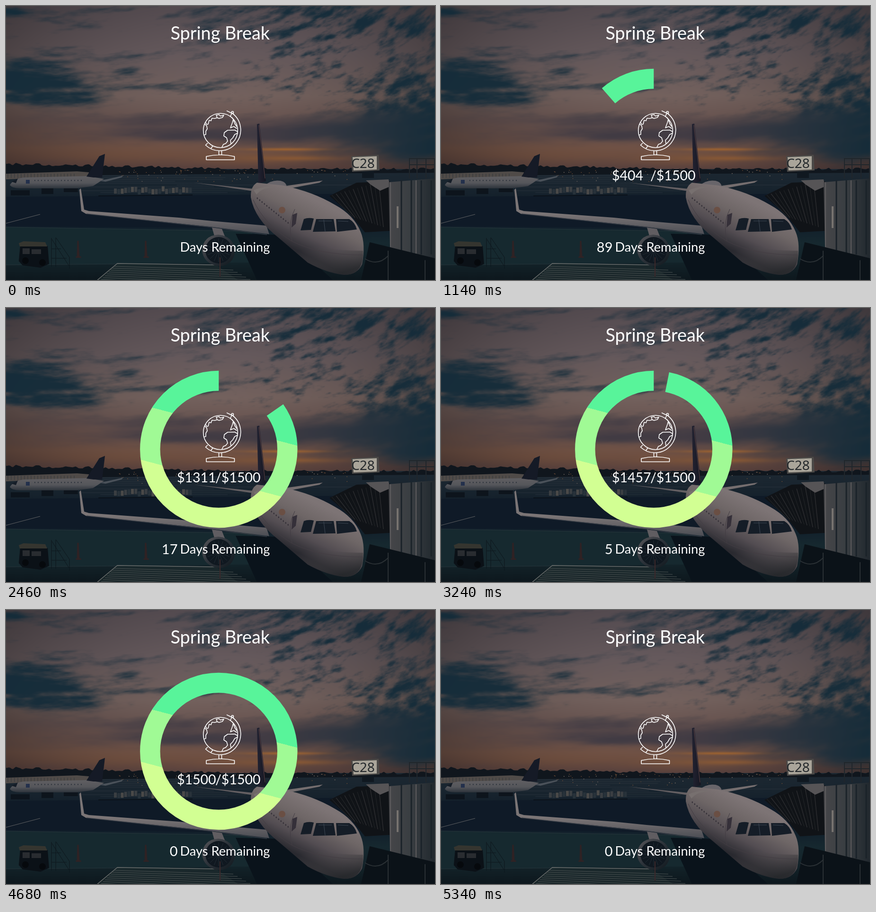
Recreate the animation shown at these times as an HTML page with a canvas. Size 906 by 580 pixels, loop 5460 ms.

```html
<!DOCTYPE html>
<html lang="en">
<head>
<meta charset="utf-8">
<title>Spring Break</title>
<style>
html, body { margin: 0; width: 100%; height: 100%; overflow: hidden; background: #101c26; }
canvas, svg { position: absolute; left: 0; top: 0; width: 906px; height: 580px; }
text { font-family: Lato, "Open Sans", sans-serif; fill: #fff; }
.icon { fill: none; stroke: #fff; stroke-width: 1.6; stroke-linejoin: round; stroke-linecap: round; }
</style>
</head>
<body>
<canvas id="photo" width="906" height="580"></canvas>
<svg viewBox="0 0 906 580">
  <defs>
    <linearGradient id="bands" gradientUnits="userSpaceOnUse" x1="0" y1="129.6" x2="-28.7" y2="238.7">
      <stop offset="0" stop-color="#58f49a"/><stop offset="0" stop-color="#a0fa95"/>
      <stop offset="1" stop-color="#a0fa95"/><stop offset="1" stop-color="#d2ff93"/>
    </linearGradient>
  </defs>
  <path id="ring" pathLength="360" fill="none" stroke="url(#bands)" stroke-width="42.5"
    d="M449.3 154A145 145 0 0 0 449.3 444A145 145 0 0 0 449.3 154"/>
  <g class="icon">
    <circle cx="453" cy="263.5" r="36.3"/>
    <path d="M477 226.500A44 44 0 1 1 421.500 294.500M421.500 294.500L425.500 290.500M432.500 302L436.500 296.500M466.500 222L481 229M473.500 234L477 227"/>
    <circle cx="478.300" cy="225.300" r="2.200"/>
    <path d="M449.500 307.500V315M455.500 307.500V315M423 325.500V318.500Q453 311.500 482.500 318.500V325.500Z"/>
    <path d="M427 250L429 242L433 243L435 237.500L441 238L446 236.500L444 231L450 230L453 233L460 231L457 236L450 238L446 236.500M427 250L424 251L422 247"/>
    <path d="M418 273L422 272L422 265L425 260L424 254L420 250"/>
    <path d="M480 240L478 247L474 258L481 255L487 259M477 236L480 240L483 249L487 255"/>
    <path d="M489 266L483 262.500L468 263L461 268L460 275L466 279L468 286L464 291L459 293L456 299M475 291L474 284L479 279L483 272L489 269"/>
  </g>
  <text x="347.500" y="71" font-size="37.800">Spring Break</text>
  <g id="money">
    <text id="saved" x="361" y="369" font-size="28.500"></text>
    <text x="537.500" y="369" font-size="28.500" text-anchor="end">/$1500</text>
  </g>
  <text id="days" x="362.500" y="520.500" font-size="29" text-anchor="end"></text>
  <text x="367.500" y="520" font-size="27.200">Days Remaining</text>
</svg>
<script>
const $ = id => document.getElementById(id);
const clamp = v => Math.max(0, Math.min(1, v));
const mix = (a, b, k) => a + (b - a) * k;
const mixRgb = (a, b, k) => a.map((v, i) => mix(v, b[i], k));
const smooth = (a, b, v) => { const k = clamp((v - a) / (b - a)); return k * k * (3 - 2 * k); };
const ctx = $('photo').getContext('2d');

// ---- Backdrop: cloudy dusk sky ----
function hash(x, y) {
  let h = Math.imul(x, 374761393) + Math.imul(y, 668265263);
  h = Math.imul(h ^ h >>> 13, 1274126177);
  return ((h ^ h >>> 16) >>> 0) / 2 ** 32;
}
function noise(x, y) {
  const i = Math.floor(x), j = Math.floor(y), u = smooth(0, 1, x - i), v = smooth(0, 1, y - j);
  return mix(mix(hash(i, j), hash(i + 1, j), u), mix(hash(i, j + 1), hash(i + 1, j + 1), u), v);
}
function fbm(x, y) {
  let sum = 0;
  for (let o = 0, amp = .5; o < 4; o++, amp /= 2) sum += amp * noise(x * 2 ** o + o * 17, y * 2 ** o);
  return sum;
}
const blob = (x, y, [cx, cy, rx, ry, amp]) => amp * Math.exp(-(((x - cx) / rx) ** 2) - ((y - cy) / ry) ** 2);
const clouds = [
  [5, 8, 45, 14, .5], [30, 160, 150, 36, .6], [110, 195, 110, 17, .4], [265, 102, 70, 9, .3],
  [410, 18, 80, 13, .3], [180, 50, 130, 14, .12], [310, 172, 110, 9, .2], [800, 40, 230, 60, .22],
  [620, 12, 110, 20, .2], [720, 135, 200, 45, .17], [900, 230, 170, 55, .5],
  [330, 242, 150, 15, .35], [400, 272, 210, 17, .45], [680, 262, 190, 26, .42], [880, 305, 180, 28, .4]
];
const glows = [[590, 303, 75, 3, .7], [615, 322, 80, 5, .4], [520, 322, 120, 14, .22], [240, 316, 180, 18, .12]];
const skyStops = [[0, [84, 75, 80]], [100, [101, 89, 92]], [190, [115, 97, 93]],
  [245, [104, 83, 79]], [300, [110, 81, 70]], [350, [84, 62, 60]]];
function skyLight(y) {
  const i = Math.max(1, skyStops.findIndex(s => s[0] > y));
  const [a, ca] = skyStops[i - 1], [b, cb] = skyStops[i];
  return mixRgb(ca, cb, (y - a) / (b - a));
}
function drawSky() {
  const img = ctx.createImageData(906, 348);
  for (let y = 0, p = 0; y < 348; y++) {
    const row = skyLight(y), low = smooth(195, 245, y);
    for (let x = 0; x < 906; x++, p += 4) {
      const tilt = y + x * x * .00022 * (1 - y / 400);
      let d = (fbm(x / 85, tilt / 15) - .47) * .85 * (1 - low * .6);
      d += (fbm(x / 22, tilt / 8) - .47) * (.25 + .6 * smooth(350, 650, x)) * (1 - low);
      for (const c of clouds) d += blob(x, y, c);
      const edge = 1 - .25 * ((x - 450) / 450) ** 2;
      const dark = mixRgb([19, 43, 57], [63, 58, 67], low * clamp((900 - x) / 350));
      let c = mixRgb(row.map(v => v * edge), dark, smooth(-.03, .55, d) * .95);
      for (const g of glows) c = mixRgb(c, [172, 104, 42], blob(x, y, g));
      img.data.set([...c, 255], p);
    }
  }
  ctx.putImageData(img, 0, 0);
}

// ---- Backdrop: airfield ----
const fill = (color, d) => { ctx.fillStyle = color; ctx.fill(new Path2D(d)); };
const line = (color, w, d) => { ctx.strokeStyle = color; ctx.lineWidth = w; ctx.stroke(new Path2D(d)); };
function ramp(x0, y0, x1, y1, ...colors) {
  const g = ctx.createLinearGradient(x0, y0, x1, y1);
  colors.forEach((c, i) => g.addColorStop(i / (colors.length - 1), c));
  return g;
}
function drawField() {
  fill(ramp(0, 345, 0, 580, '#1d2832', '#18242e', '#101c28', '#111e2a', '#16282f', '#132329', '#0d171d'), 'M0 345H906V580H0Z');
  fill('#0f1a27', 'M0 404L906 396V458L430 470L0 466Z');
  fill('#16292f', 'M0 468L520 476V543L0 548Z');
  // Tree line and runway lights
  let trees = 'M0 356';
  for (let x = 0; x <= 906; x += 3) trees += `L${x} ${331 + 11 * clamp(x / 500) + 6 * noise(x / 7, 3)}`;
  fill('#10161d', trees + 'L906 353L400 356L0 360Z');
  for (let i = 0; i < 75; i++) {
    ctx.fillStyle = i % 3 ? '#7c5539' : '#948476';
    ctx.fillRect(230 + hash(i, 1) * 500, 347 + hash(i, 2) ** 2 * 24, 1.5, 1.3);
  }
  for (let i = 0; i < 10; i++) line('#2e3941', .7, `M${hash(i, 5) * 250 + 120} ${359 + i * 4}h${200 + hash(i, 6) * 180}`);
  line('#5c5e60', 1.2, 'M0 460L72 441');
  line('#25343a', 1, 'M0 468L520 477M0 548L240 546');

  // Parked plane and terminal
  fill('#504b48', 'M0 355L150 350L175 352V360L0 367Z');
  for (let x = 4; x < 150; x += 7) line('#33383c', 1, `M${x} 355v9`);
  fill(ramp(0, 361, 0, 388, '#5f5e61', '#55565b', '#262d35'), 'M8 379Q17 365 38 363L170 360L207 366L184 381L150 386H30Q13 386 8 379Z');
  fill('#151a26', 'M170 361L197 318L209 313L203 363L185 363Z');
  fill('#4a5159', 'M198 370L248 359L244 363L210 372Z');
  fill('#151d27', 'M12 372L25 365L21 375Z');
  fill('#23304c', 'M42 368h8v8h-8z');
  for (let x = 60; x < 164; x += 7) { ctx.fillStyle = '#30363f'; ctx.fillRect(x, 368, 2, 2.500); }
  fill('#0d141c', 'M75 386h25v12H75ZM122 386h30v8h-30ZM10 390h40v11H10Z');
  for (let i = 0; i < 23; i++) {
    ctx.fillStyle = ['#3a3e42', '#28323a', '#4a4948'][i % 3];
    ctx.fillRect(228 + i * 7.200, 381 + hash(i, 8) * 7, 6, 11);
  }
  line('#0b121a', 2, 'M195 402L394 400');

  // Apron markings
  fill('#202d3099', 'M192 580L236 545L445 549L490 580Z');
  line('#6a6d6c', 1.500, 'M193 580L235 545L440 548');
  for (let i = 0; i < 9; i++) line('#4a5252', 1, `M${229 - i * 4} ${551 + i * 4}L${480 + i * 9} ${559 + i * 5}`);

  // Service cart, steps and cones
  fill('#0b1117', 'M30 507L88 508L91 546L73 554L35 549L27 540Z');
  fill('#35352f', 'M27 502L37 498L83 500L87 509L29 509Z');
  fill('#292c30', 'M35 513h15v12H35ZM54 515h20v10H54Z');
  fill('#06090d', 'M34 539a7 7 0 1 0 14 0a7 7 0 1 0-14 0M70 543a7 7 0 1 0 14 0a7 7 0 1 0-14 0');
  line('#0d161c', 1, 'M96 491V552M105 490V552M97 494L133 550M106 491L134 532V556M96 514H116M96 534H128');
  for (const x of [152, 295]) fill('#2f2224', `M${x - 1.5} 497h3l2 33h3v3h-11v-3h2z`);

  // Airliner shadow, tail and wing
  fill('#0a131b', 'M485 482L568 484L660 552L690 580H530Z');
  fill(ramp(529, 0, 548, 0, '#232332', '#161722'), 'M530 250L535 249L549 371L533 376Z');
  line('#5c4344', 1, 'M534 252L547 365');
  fill('#645f62', 'M397 374L522 387V392L455 382Z');
  fill('#756e6f', 'M590 381L669 369.500L662 374L605 385Z');
  fill(ramp(0, 440, 0, 485, '#7b7576', '#494b52'), 'M155 389L158 386L165 431L175 434L365 448L434 455L550 465L556 483L430 467L169 440L159 434Z');
  line('#343a43', 1.500, 'M170 440L430 468L551 484');
  fill('#605d61', 'M435 469L456 472L466 497H443Z');

  // Engine
  fill(ramp(410, 480, 480, 550, '#5f5c5f', '#2e343b', '#11191f'), 'M414 517Q417 486 448 484Q481 487 484 519Q480 549 450 551Q417 546 414 517Z');
  fill('#101820', 'M421 517a28 28 0 1 0 56 0a28 28 0 1 0-56 0');
  for (let i = 0; i < 16; i++) {
    const a = i * Math.PI / 8;
    line('#222c34', 1, `M449 517L${449 + 25 * Math.cos(a)} ${517 + 25 * Math.sin(a)}`);
  }
  fill('#42454b', 'M445 517a4 4 0 1 0 8 0a4 4 0 1 0-8 0');
  line('#3b282a', 2, 'M452 532V573');

  // Jet bridge
  fill('#101317', 'M683 402L740 374L811 371V476L758 479L727 440Z');
  for (let i = 0; i < 12; i++) line(i % 2 ? '#2b2c2f' : '#1d2023', 1.500, `M${688 + i * 9} ${400 - i * 2.500}L${731 + i * 6} ${446 + i * 2}`);
  fill('#565456', 'M760 369L808 367L811 382L790 391L770 378Z');
  fill(ramp(808, 0, 906, 0, '#464649', '#383d41', '#21282e'), 'M808 373L906 365V548L811 514Z');
  for (let x = 835; x < 906; x += 21) line('#1a2229', 3, `M${x} 369V526`);
  line('#5d5b5d', 2, 'M812 373V510M866 369V535');
  line('#20262b', 2, 'M852 365V323H905V367M852 336H905M868 323V365M887 323V365');
  fill('#0b1218', 'M768 500L906 534V580H750Z');
  line('#2a3034', 2, 'M758 535Q785 552 808 528M807 518V580M885 538V580');
  line('#77736f', 4, 'M827 424V470');

  // Fuselage and nose
  fill('#68656a', 'M546 380Q561 367 580 370Q593 373 593 385Z');
  fill(ramp(640, 405, 590, 505, '#7d7475', '#6e6666', '#534d52', '#29292f'),
    'M517 405Q516 382 530 374L586 380Q648 393 695 421Q735 443 749 478Q760 504 752 547Q741 570 713 569Q676 565 637 543L575 490Q525 451 517 405Z');
  fill(ramp(670, 500, 695, 570, '#5c565800', '#26282bcc'), 'M600 487Q658 519 754 518Q756 565 720 569Q677 565 637 543L575 490Z');
  line('#433d43', 1, 'M522 410Q544 461 604 498Q660 527 754 527M610 430Q594 459 604 498');
  fill('#151d27', 'M629 451Q639 447 650 450L644 474L622 475ZM655 451L692 451L696 477L648 478ZM697 451L725 451Q737 458 741 473L699 478Z');
  line('#3e4854', 1, 'M660 455L688 455M701 455L723 456M671 452L674 477');
  for (let i = 0; i < 14; i++) fill('#322e36', `M${530 + i * 5} ${405 + i * 4}l2 1l-.5 3l-2-1z`);
  fill('#6a4f44', 'M576 432a7 7 0 1 0 14 0a7 7 0 1 0-14 0');
  fill('#353039', 'M605 442L615 438L612 461L603 469Z');
  fill('#77706f', 'M523 390Q548 379 567 384Q541 384 529 399Z');

  // Gate sign
  fill('#101820', 'M752 347h25v17h-25z');
  fill('#4b4947', 'M729 318L787 315L789 348L731 351Z');
  fill('#aaa59a', 'M732 320L783 318V346L734 348Z');
  ctx.fillStyle = '#25292c';
  ctx.font = '500 28px "Noto Sans", Roboto, sans-serif';
  ctx.fontStretch = 'extra-condensed';
  ctx.textAlign = 'center';
  ctx.fillText('C28', 754, 343);
}

// ---- Counters ----
// Remaining amounts over time, joined by quartic ease-out.
const moneyLeft = [[650, 1500], [1140, 1096], [1830, 442], [2460, 189], [3240, 43], [4440, .49]];
const daysLeft = [[650, 120], [1140, 89], [1830, 39], [2460, 17], [3240, 5], [4290, .4]];
const arcLeft = [[850, 360], [1140, 318.800], [1830, 135], [2340, 65.500], [2460, 55], [2910, 24.100], [3240, 11.300], [4440, 0]];
function left(keys, t) {
  const i = keys.findIndex(k => k[0] > t);
  if (i < 0) return keys[keys.length - 1][1];
  if (!i) return keys[0][1];
  const [t0, a] = keys[i - 1], [t1, b] = keys[i];
  return mix(a ** .25, b ** .25, (t - t0) / (t1 - t0)) ** 4;
}
function frame(now) {
  const t = Math.floor(now % 5460 / 30) * 30;
  const fadeIn = clamp((t - 80) / 480), fadeOut = 1 - clamp((t - 4690) / 530);
  $('ring').setAttribute('stroke-dasharray', `${360 - left(arcLeft, t)} 720`);
  $('ring').setAttribute('opacity', fadeOut);
  $('saved').textContent = '$' + Math.round(1500 - left(moneyLeft, t));
  $('money').setAttribute('opacity', Math.min(fadeIn, fadeOut));
  $('days').textContent = Math.round(left(daysLeft, t));
  $('days').setAttribute('opacity', fadeIn);
  requestAnimationFrame(frame);
}

drawSky();
drawField();
requestAnimationFrame(frame);
</script>
</body>
</html>
```
